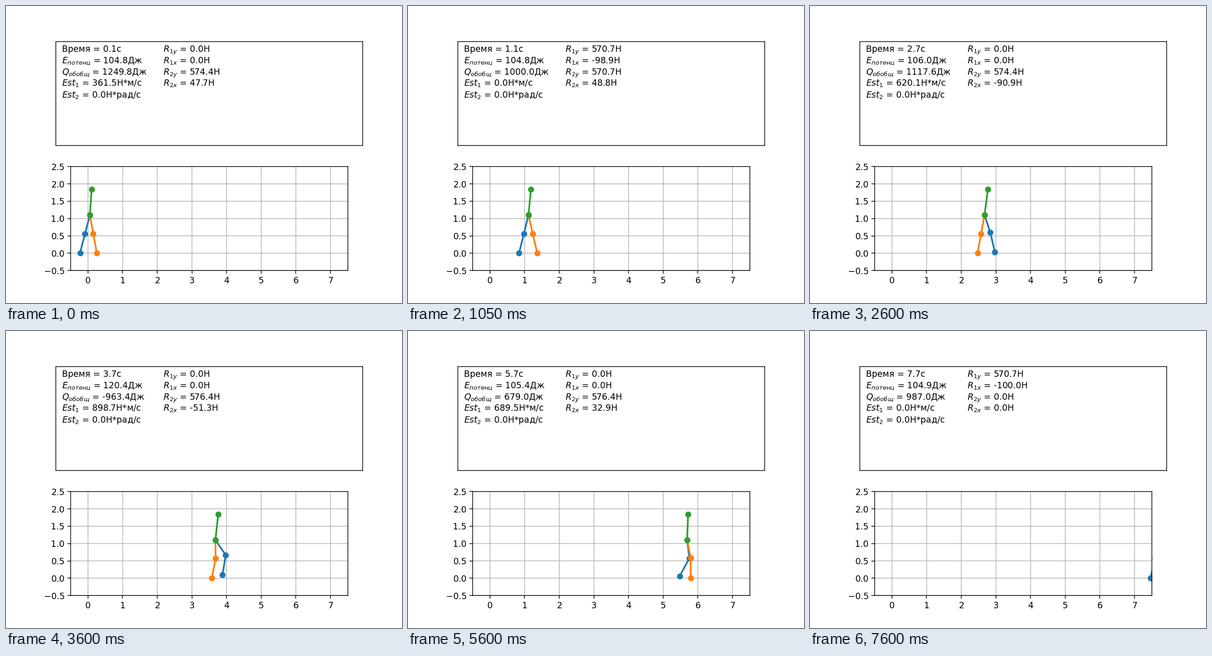
Write a matplotlib script that moves like this. It is 864 by 648 pixels and loops after 7.65 s.

```python
import numpy as np
import matplotlib.pyplot as plt
from matplotlib.animation import FuncAnimation

W, H = 640, 480     # layout grid
DT = 0.05           # seconds per frame
FRAMES = 153
HALF = 11           # frames per step
CYCLE = 2 * HALF    # frames per full stride
STRIDE = 1.107      # metres per full stride
HIP, TORSO = 1.1, 0.75
THIGH, SHIN = 0.525, 0.585
LIFT = 0.11
DRAG = 2            # the foot starts to slide this many frames before lift-off


def hip_x(k):
    return 0.004 + STRIDE * k / CYCLE


def reach(s):
    """Share of the stride the swinging foot has covered."""
    e = s ** 1.15
    return 0.12 * s + 0.88 * (e - np.sin(2 * np.pi * e) / (2 * np.pi))


def knee(dx, dy):
    """Knee offset from the hip, bent forwards, for a foot at (dx, -dy)."""
    d = np.hypot(dx, dy)
    if d < THIGH + SHIN:
        along = (THIGH ** 2 - SHIN ** 2 + d * d) / (2 * d)
        bend = np.sqrt(THIGH ** 2 - along ** 2)
    else:
        along, bend = 0.493 * d, 0
    return (along * dx + bend * dy) / d, (bend * dx - along * dy) / d


def leg(k, shift):
    """Hip, knee and foot of a leg running `shift` frames ahead."""
    n, q = divmod(k + shift + DRAG, CYCLE)
    s = min(q / (HALF + DRAG), 1)
    fx = STRIDE * (n - shift / CYCLE + reach(s)) - 0.2985
    lift = (q - DRAG) / HALF
    fy = LIFT * np.sin(np.pi * lift) ** 2 if 0 < lift < 1 else 0
    hx = hip_x(k)
    kx, ky = knee(fx - hx, HIP - fy)
    return [hx, hx + kx, fx], [HIP, HIP + ky, fy]


def torso(k):
    hx = hip_x(k)
    dx = 0.0615 + 0.035 * np.cos(2 * np.pi * (k - 8.7) / HALF)
    return [hx, hx + dx], [HIP, HIP + np.sqrt(TORSO ** 2 - dx ** 2)]


def body(k):
    """Potential energy and generalised force."""
    u = k % HALF
    bump = np.exp(-((u - 6.15) / 1.7) ** 2)
    return 104.8 + 20 * bump, 1000 - 2200 * bump + 250 * np.sin(np.pi * u / 2)


def loads(k, shift):
    """Reactions y and x and the swing power of a leg."""
    q = (k + shift) % CYCLE
    if 0 < q < HALF:
        return 0.0, 0.0, (560 + 55 * q) * abs(np.sin(np.pi * q / 5))
    u = q - HALF if q else HALF
    ry = 570.7 + 6.3 * max(np.sin(np.pi * u / 10), 0) ** 0.45
    rx = -26 + 74.8 * np.cos(np.pi * (u / 10.4) ** 1.25)
    return ry, rx, 0.0


plt.rcParams["path.snap"] = False
fig = plt.figure(figsize=(6.4, 4.8), dpi=135)


def axes(left, top, width, height):
    return fig.add_axes([left / W, 1 - (top + height) / H, width / W, height / H])


panel = axes(80.5, 57.5, 496, 168)
panel.set(xticks=[], yticks=[])
ax = axes(104.5, 259.5, 448, 168)
ax.set(xlim=(-0.5, 7.5), ylim=(-0.5, 2.5),
       xticks=range(8), yticks=np.arange(-0.5, 2.6, 0.5))
ax.grid(True)

blue, orange, green = (ax.plot([], [], "o-", lw=2)[0] for _ in range(3))


def column(x, rows):
    return [panel.text(x, 0.9 - 0.11 * r, "", transform=panel.transAxes)
            for r in range(rows)]


labels = column(0.02, 5) + column(0.35, 4)


def update(i):
    k = i + 1
    blue.set_data(*leg(k, 0))
    orange.set_data(*leg(k, HALF))
    green.set_data(*torso(k))

    energy, force = body(k)
    r1y, r1x, p1 = loads(k, 0)
    r2y, r2x, p2 = loads(k, HALF)
    lines = [
        f"Время = {k * DT:.1f}с",
        f"$E_{{потенц}}$ = {energy:.1f}Дж",
        f"$Q_{{обобщ}}$ = {force:.1f}Дж",
        f"$Est_1$ = {p1:.1f}Н*м/с",
        f"$Est_2$ = {p2:.1f}Н*рад/с",
        f"$R_{{1y}}$ = {r1y:.1f}Н",
        f"$R_{{1x}}$ = {r1x:.1f}Н",
        f"$R_{{2y}}$ = {r2y:.1f}Н",
        f"$R_{{2x}}$ = {r2x:.1f}Н",
    ]
    for label, line in zip(labels, lines):
        label.set_text(line)
    return [blue, orange, green, *labels]


anim = FuncAnimation(fig, update, frames=FRAMES, interval=1000 * DT,
                     repeat=True, repeat_delay=0)
plt.show()
```
